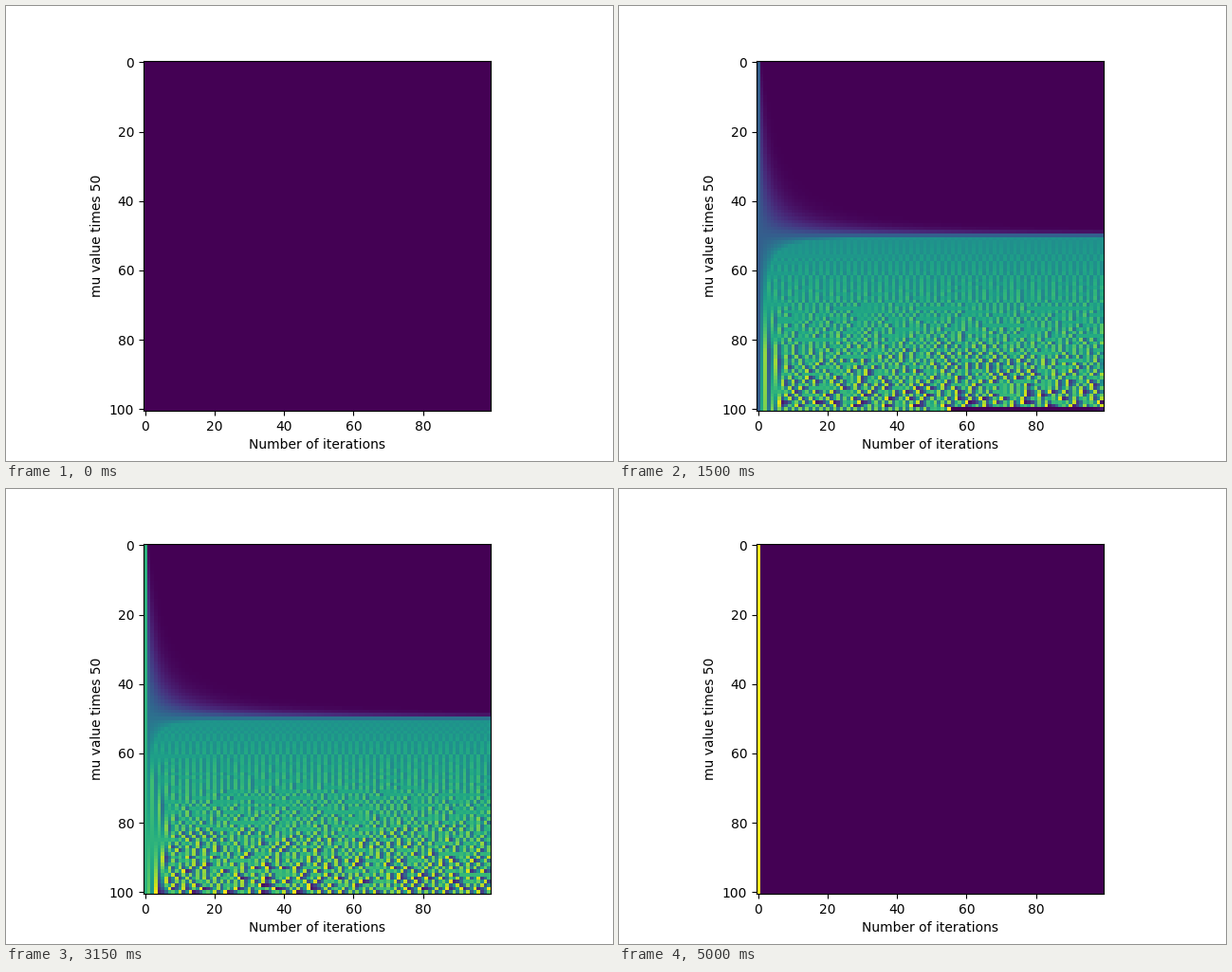
A matplotlib script for the animation above (5050 ms loop, 640 by 480 pixels).

```python
import matplotlib.pyplot as plt
import numpy as np
from matplotlib.animation import FuncAnimation

STEPS = 100      # iterations shown along x
FRAMES = 101     # starting values 0.00 to 1.00
INTERVAL = 50    # ms

# Running sum on purpose: its rounding decides the fate of the last row.
mu = np.cumsum(np.r_[0.0, np.full(100, 0.02)])


def tent_orbits(x0):
    """Tent map orbits from x0, one row per mu."""
    orbits = np.empty((mu.size, STEPS))
    x = np.full(mu.size, x0)
    for n in range(STEPS):
        orbits[:, n] = x
        x = mu * np.minimum(x, 1 - x)
    return orbits


fig, ax = plt.subplots(figsize=(6.4, 4.8), dpi=100)
image = ax.imshow(tent_orbits(0.0), cmap="viridis")
ax.set_xlabel("Number of iterations")
ax.set_ylabel("mu value times 50")


def update(i):
    image.set_data(tent_orbits(i / 100))
    image.autoscale()
    return [image]


anim = FuncAnimation(fig, update, frames=FRAMES, interval=INTERVAL,
                     repeat=True, repeat_delay=0)
plt.show()
```
